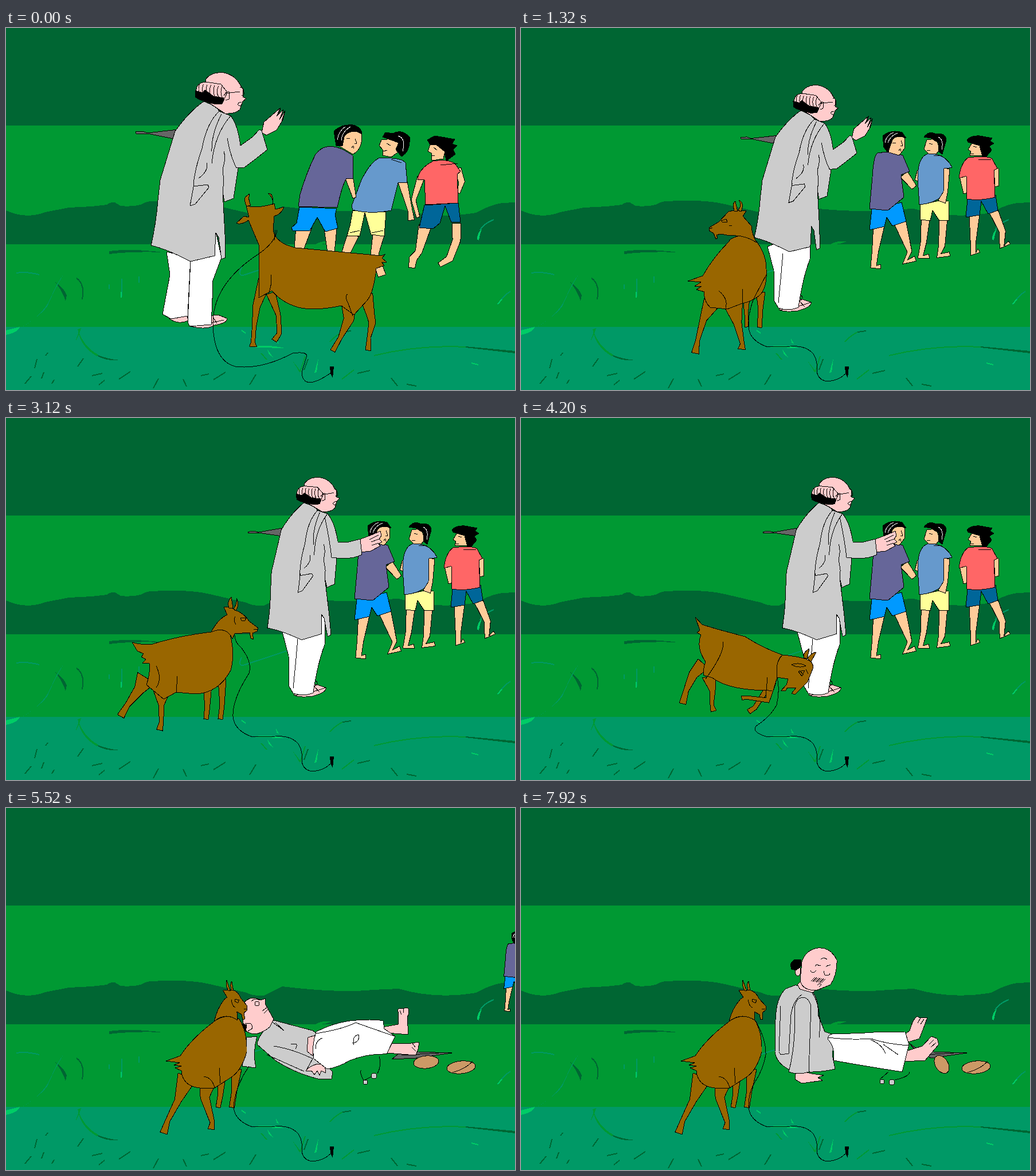
Recreate the animation shown at these times as an HTML page. Size 888 by 631 pixels, loop 8 s.

```html
<!DOCTYPE html>
<html lang="en">
<head>
<meta charset="utf-8">
<title>The goat in the field</title>
<style>
html, body { margin: 0; width: 100%; height: 100%; overflow: hidden; background: #063; }
svg { display: block; width: 888px; height: 631px; shape-rendering: crispEdges; }
path { vector-effect: non-scaling-stroke; stroke-linejoin: round; }
</style>
</head>
<body>
<svg id="stage" viewBox="0 0 888 631"></svg>
<script>
const LOOP = 8000, STEP = 120;
const stage = document.getElementById('stage');
const black = '#000', white = '#fff', grey = '#ccc', pink = '#fcc', slate = '#666', tan = '#fc9';
const leather = '#c96', brown = '#960', dark = '#063', green = '#093', teal = '#096', lime = '#0c6';

function add(parent, tag, attrs) {
  const node = document.createElementNS('http://www.w3.org/2000/svg', tag);
  for (const key in attrs) node.setAttribute(key, attrs[key]);
  return parent.appendChild(node);
}
const flat = (fill, d) => add(stage, 'path', { d, fill });
const blade = (stroke, d) => add(stage, 'path', { d, fill: 'none', stroke, 'stroke-width': 2 });

// Scenery
flat(dark, 'M0 0H888V170H0Z');
flat(green, 'M0 170H888V521H0Z');
flat(teal, 'M0 521H888V631H0Z');
flat(dark, 'M0 318Q35 334 68 321L110 313 150 311 176 308Q182 303 190 304L200 310Q220 312 235 308 245 302 255 302 320 298 360 308L420 322Q430 328 450 327L482 311Q580 323 640 317L685 315Q750 334 820 322 845 308 865 305L888 304V377H0Z');
flat(dark, 'M180 389Q220 384 273 391Q220 389 180 394Z');
flat(dark, 'M86 443Q102 454 106 466L104 476Q98 458 86 443Z');
flat(teal, 'M100 430Q88 446 79 468 66 500 25 523 62 500 72 485 85 455 100 430Z');
flat(lime, 'M0 527L24 521Q22 530 0 535Z');
flat(lime, 'M430 556Q455 551 487 558L440 557ZM545 576L542 600 538 601ZM471 541l5 9-4-1Z');
flat(lime, 'M822 369Q822 357 830 350Q826 362 825 370ZM456 560l10 14-7-5Z');
flat(green, 'M131 523Q128 536 121 546L127 530Q138 558 162 570L158 572Q130 556 125 525Z');
flat(green, 'M540 377Q552 370 568 372Q555 378 540 377ZM500 580l14 18-2 2Z');
flat(dark, 'M160 570Q180 578 201 579Q175 581 160 572ZM802 555L888 563V567L802 557Z');
blade(teal, 'M18 427Q35 424 58 430M180 447v8M202 437v31M232 433v11');
blade(teal, 'M505 401L420 429Q402 436 411 417M858 482Q866 468 880 459M827 352Q835 340 851 334');
blade(dark, 'M123 436Q138 446 133 473M587 530l15-2M613 602l22-5M527 577l-7 19');
blade(dark, 'M73 566l-4 5M54 577l-4 16M66 600l-4 11M44 607l-11 13M84 613l-4 7M135 576l-10 14M168 602l-18 4M217 599l-20 13');
blade(dark, 'M172 614l-10 8M266 611l-9 17M309 612l6 13M340 606l14-3M383 600l-21 13M436 604l-11 18M672 610l11 14M699 621l17 3');
blade(green, 'M642 571Q720 552 802 556M565 547Q575 536 587 530M586 612l21-16M445 567l10 11M522 572l-9 28');
blade(lime, 'M411 527l7 5M812 584l12 3M201 460v10M858 481l7-8');

// Pose drawing: each shape call adds to the pose opened last.
const art = {};
let sheet;
const pose = name => { sheet = art[name] = []; };
const ink = (fill, d) => sheet.push({ d, fill, stroke: black });
const line = d => ink('none', d);
const shine = d => sheet.push({ d, fill: 'none', stroke: white });
const oval = (fill, x, y, rx, ry, tilt = 0) =>
  ink(fill, `M${x - rx * Math.cos(tilt)} ${y - rx * Math.sin(tilt)}` +
    [1, -1].map(s => `a${rx} ${ry} ${tilt * 180 / Math.PI} 0 1 ${2 * s * rx * Math.cos(tilt)} ${2 * s * rx * Math.sin(tilt)}`).join(''));

// A tapering limb along joints given as "x y width".
function limb(fill, text) {
  const joints = text.split('  ').map(j => j.split(' ').map(Number));
  const side = s => joints.map(([x, y, w], i) => {
    const a = joints[Math.max(0, i - 1)], b = joints[Math.min(joints.length - 1, i + 1)];
    const angle = Math.atan2(b[1] - a[1], b[0] - a[0]) + s * Math.PI / 2;
    return `${(x + Math.cos(angle) * w / 2).toFixed(1)} ${(y + Math.sin(angle) * w / 2).toFixed(1)}`;
  });
  ink(fill, `M${[...side(1), ...side(-1).reverse()].join('L')}Z`);
}
const strands = (x, y, dx, dy, curl) =>
  line(Array.from({ length: 7 }, (_, i) => `M${x + i * dx} ${y + i * dy}${curl}`).join(''));

// Boys
pose('boy1Turn');
limb(tan, '598 258 14  608 296 6');
limb(tan, '520 345 28  510 390 15');
limb(tan, '566 350 22  567 392 12');
ink('#09f', 'M512 312L577 315 574 325 579 349 557 355 543 330 530 353 500 353 498 348 507 340Z');
ink('#669', 'M560 207Q575 205 590 213L605 222 606 262 594 262Q586 275 578 313L510 311 513 290Q525 250 540 220 550 208 560 207Z');
ink(tan, 'M582 190Q592 174 612 178L621 185Q622 212 605 220L580 205Z');
ink(black, 'M572 180Q585 167 605 169 620 172 621 185L611 180Q595 180 590 190L587 205 576 205Z');
shine('M578 195Q580 180 592 172M585 196Q586 181 601 172');
line('M594 192l6 1M609 193l3 8-4 1M603 209q4-7 4 1');

pose('boy2Turn');
limb(tan, '692 268 16  705 318 8  707 335 11');
limb(tan, '606 360 20  592 394 14');
limb(tan, '650 360 20  643 395 14  656 432 14');
ink('#ff9', 'M605 318L663 321 660 363 637 360 626 322 617 363 595 362 600 345Z');
ink('#69c', 'M650 227Q690 225 697 235L700 269 684 270 672 318Q635 325 605 317L603 310 620 265Q635 235 650 227Z');
ink(tan, 'M655 195L685 192 690 212 672 225 657 222 657 212 651 205Z');
ink(black, 'M657 190L662 182 675 184Q690 175 704 190 706 215 690 224L680 212 685 200Z');
shine('M684 188Q698 192 692 215');
line('M664 201l7 4M658 215l7-2M600 357l17-4M638 357l20-4M672 229l18 6');

pose('boy3Turn');
limb(tan, '724 260 13  711 300 8  719 330 6');
limb(tan, '788 245 12  795 268 11  790 288 4');
limb(tan, '731 345 22  720 390 12  710 402 14  708 418 11');
limb(tan, '786 340 16  786 370 14  774 402 13  756 413 8');
ink('#069', 'M730 309L789 305 793 338 777 339 766 310 757 340 745 350 721 348Z');
ink('#f66', 'M745 232Q770 228 783 236L793 250 787 255 789 305 732 308 730 265 718 264Q720 245 745 232Z');
ink(tan, 'M740 203L756 200 766 215 763 228 743 231 742 218 736 215Z');
ink(black, 'M735 195L748 188 783 194 778 202 787 205 780 212 784 220 768 232 765 215 750 203 740 203Z');
line('M746 208l6 5M742 222l6 1M758 239l30-3');

pose('boy1');
limb(tan, '668 255 16  686 278 10');
limb(tan, '625 340 20  618 390 11  615 416 11  627 416 8');
limb(tan, '660 335 22  678 390 8  670 408 11  688 402 9');
ink('#09f', 'M612 316L664 304 672 337 648 345 638 330 634 346 608 352Z');
ink('#669', 'M622 218Q645 214 666 222L678 250 663 256 668 295 640 318 608 315 613 260Q615 222 622 218Z');
ink(tan, 'M640 195Q655 183 670 192L669 210 660 222 642 217Z');
ink(black, 'M631 188Q645 176 665 182L672 192Q655 185 648 195L640 217 633 208Z');
shine('M635 200Q637 187 650 182M640 200Q644 188 657 183');
line('M648 200l6 1M663 196l3 9-4 1M659 214q4-7 4 1');

pose('boy2');
limb(tan, '696 250 10  690 266 6');
limb(tan, '706 330 15  702 375 10  697 399 10  712 398 8');
limb(tan, '737 330 14  734 380 11  729 397 10  748 394 7');
ink('#ff9', 'M696 308L735 300 746 302 747 335 730 336 718 318 714 336 697 334Z');
ink('#69c', 'M710 219Q740 218 752 243L738 246 737 290Q725 305 695 308L692 262Q692 225 710 219Z');
limb(tan, '743 245 10  741 285 7  734 303 14');
ink(tan, 'M708 195L725 193 730 212 725 219 712 220 703 211Z');
ink(black, 'M703 190Q712 178 724 185 740 182 742 195L735 220 728 215 728 200 715 192Z');
shine('M728 190Q738 195 734 212');
line('M712 201l6 2M708 214l6-1M720 222l14 0');

pose('boy3');
limb(tan, '771 256 13  776 288 8');
limb(tan, '829 245 8  830 276 6');
limb(tan, '791 325 18  789 370 10  789 394 11  799 388 7');
limb(tan, '824 318 16  840 355 11  839 382 9  852 374 6');
ink('#069', 'M779 298L828 291 832 318 815 324 803 302 800 326 776 330Z');
ink('#f66', 'M780 226Q815 222 822 228L831 245 825 248 827 295Q800 302 778 298L777 258 764 262Q767 235 780 226Z');
ink(tan, 'M787 200L800 203 806 222 783 222 785 215 780 212Z');
ink(black, 'M778 195Q785 187 800 188L822 192 818 197 825 201 817 206 821 213 812 224 805 224 800 205 780 199Z');
line('M789 206l6 2M785 219l5 0M798 230l22-1');

// Man
pose('strideLegs');
ink(pink, 'M284 506Q300 518 318 510L316 502 290 500Z');
ink(pink, 'M322 520Q350 527 364 518 388 514 385 506L370 500 355 502Z');
line('M322 521Q350 516 380 509M362 505l6 10');
ink(white, 'M280 390L286 430 273 499 288 507 317 502 322 400Z');
ink(white, 'M322 405L317 512 320 520 358 517Q360 480 361 440L376 400 366 355Z');

pose('standLegs');
ink(pink, 'M502 483Q512 488 535 485 560 478 558 470L540 464 508 476Z');
line('M502 484Q530 480 558 470M535 460q9-4 8 4l-5 4 9 10');
ink(white, 'M482 373L493 415 494 468 501 480Q520 486 536 479 543 430 556 395L557 343Z');
line('M509 385L505 430 501 471');

pose('walk');
ink(slate, 'M226 181L238 180 247 183 300 177 297 194 247 184 227 184Z');
ink(grey, 'M345 128Q367 136 372 145L392 153Q405 170 409 205L405 245 397 297 381 303 378 285 382 360 383 400 376 403 371 365 366 357 364 397 322 407Q280 385 253 379 262 340 265 300L269 265 295 180Q320 145 345 128Z');
line('M373 144Q350 165 342 210 328 250 327 276L352 273 354 278 330 307 321 310 328 272');
line('M376 150Q358 185 359 215M392 153Q364 185 359 236M350 235q4 14-14 27M380 215Q384 228 378 245L380 268 378 285');
ink(pink, 'M348 90Q358 76 380 78 400 82 409 100L414 107 413 120 419 123 413 128 408 142Q400 150 382 149L348 126Z');
ink(pink, 'M333 120Q327 96 348 94L375 98 386 112 378 130Z');
ink(black, 'M330 109L343 113 347 108 362 119 380 122 377 132 365 133 338 125 331 121Z');
strands(338, 97, 6.5, .8, 'q-4 10 0 19');
line('M380 118q6-10 10-6l-1 12-6 2M382 114l26-3M408 103q8 0 7 14l-4 1M411 129q-10 2-4 7l3-1');

pose('armUp');
ink(pink, 'M446 182L450 164 479 139 476 150 484 142 480 155 487 144 483 160 472 178 454 187Z');
ink(black, 'M479 139l-7 15 4-4ZM484 142l-7 18 3-5ZM487 144l-6 18 2-2Z');
ink(grey, 'M386 192Q392 225 402 244L416 243Q440 225 456 212L446 179 442 177 430 190 409 205');

pose('armOut');
ink(pink, 'M616 212L640 203 653 197 655 205 651 211 656 216 650 219 653 223 636 232 618 234Z');
line('M634 212l16-8M637 216l14-5M638 222l12-4');
ink(grey, 'M556 172Q565 215 568 243 602 248 621 238L618 211 598 216 579 216');

pose('fall');
ink(pink, 'M648 235L656 232 668 246 655 252ZM668 330L676 324 679 345 677 361 670 361Z');
ink(white, 'M600 305L612 303Q640 325 672 336L673 360 655 376Q630 355 613 339L596 338Z');
ink(white, 'M597 275Q640 268 653 250L668 245 683 262 682 274Q650 300 600 308Z');
oval(leather, 688, 281, 14, 7);
ink(pink, 'M478 183L477 160 489 143 491 153 496 145 496 155 501 149 505 161 495 186Z');
ink(grey, 'M425 236Q460 230 472 215 477 198 473 181L498 184Q497 210 488 225L465 247Q490 266 515 272 540 280 545 268L583 262 600 273 602 290Q590 340 587 381 575 382 570 370 545 352 515 357 480 345 470 340L481 377 437 381 441 360 436 325Q400 300 390 275 400 245 425 236Z');
line('M400 256Q440 290 436 325M410 248Q438 280 445 315M425 238Q458 290 470 342M451 313q9 7 4 22M585 267l-24 17 41-4');
ink(pink, 'M352 240Q362 222 385 220L392 214 395 221 404 225 411 240 405 250 380 278Q345 275 352 240Z');
ink(pink, 'M364 266Q360 284 378 288L394 252 385 244Z');
ink(black, 'M389 247L398 254 394 268 387 272 378 288 372 284 379 270Z');
strands(364, 264, 3.5, -3, 'q-6 6-3 14');
line('M382 240q10-4 11 6M390 215l7 12M398 226q7 2 4-6');

pose('lie');
ink(pink, 'M657 382L684 377 684 355Q682 348 690 350L700 348Q706 352 700 365L702 395 665 392Z');
ink(pink, 'M665 410L700 411 721 408 719 420 715 431 664 427Z');
line('M687 353l3 7M693 350l1 7M709 410l5 7M708 417l7 7');
ink(grey, 'M420 400L438 398Q430 425 436 453L412 450Z');
ink(grey, 'M467 370L535 388 545 395 540 430 570 460 568 472 548 473Q505 463 470 440L438 412Q440 395 467 370Z');
line('M455 430L520 459M467 415Q500 420 535 437L523 459M463 372l22 16-15-14M497 412q15-4 8 8');
ink(pink, 'M527 400L540 396 535 432 525 424Z');
ink(pink, 'M523 458Q536 443 556 447L558 462 550 458 547 466 543 458 538 465 533 458Z');
ink(white, 'M541 390Q570 375 600 371 640 367 658 371L660 385 679 398 664 429Q630 428 600 440 580 452 560 455L537 437Q533 415 541 390Z');
line('M541 393Q590 385 610 374 640 385 679 398M540 420q0-15 12-19M607 413q-4-15 8-18 3 13-11 15');
ink(pink, 'M415 340Q425 326 445 335L452 332 453 343 467 368 460 382Q435 402 418 388 410 372 415 340Z');
ink(black, 'M411 376l9 2-2 12Z');
oval('none', 438, 341, 4, 4);
line('M428 337q8-7 14-2M447 354l9-7M450 358l8-8M417 376q13-4 13 8l-8 5');

pose('sit');
ink(pink, 'M668 396L678 388Q685 365 692 363L695 366 709 365Q702 385 695 402L676 408Z');
ink(pink, 'M668 425L700 415 716 398 726 402 729 412 705 440 668 442Z');
line('M692 375l5-9M697 377l6-9M712 412l8-8M715 417l9-8');
ink(grey, 'M478 309Q490 308 509 321 520 335 518 360L530 390 548 396 543 430 548 455Q510 464 470 457 445 445 443 425L444 370Q445 330 462 315Z');
ink(white, 'M535 403Q536 392 550 394L600 392 615 391 670 390 677 412 665 460Q600 450 545 440 548 415 535 403Z');
line('M535 400Q580 405 610 402 640 412 677 414M610 404q20 8 26 24M632 412l26 18');
ink(pink, 'M480 456L507 463 528 466 518 470 526 475 490 480 478 473Z');
ink(grey, 'M478 360Q475 340 485 332 500 325 506 345L502 460Q485 466 467 460 478 420 478 360Z');
line('M453 345L450 425 453 430 467 428 471 360Q475 335 490 325M508 322Q526 350 520 400');
ink(pink, 'M482 308L487 316 509 322 515 316 490 300Z');
ink(pink, 'M490 268Q497 247 518 244 540 242 551 265 552 290 540 308L515 318Q490 318 487 300Z');
oval(pink, 483, 284, 5, 9);
ink(black, 'M470 272L476 265 488 264 489 275 480 283 472 281Z');
line('M523 264q5-5 11 0M513 276q4-6 6-1l4-1M532 277q4-4 8-3M505 283q3 8 10 0M528 284l2 7q8 3 9-3');
strands(506, 302, 3, .5, 'l7-7');
line('M517 309q3-5 7-1l-4 4');

// Scattered belongings
pose('airProps');
ink(slate, 'M613 179L700 214 709 221 705 237 696 235 693 243 691 232Q650 205 613 179Z');
line('M613 179L697 228M640 195l64 27M703 238q3 8 11 8 4-6-8-14M614 238q2-10 20-10l0-6');
oval(grey, 618, 239, 5, 4);
oval(grey, 635, 246, 5, 4);
oval(leather, 759, 332, 18, 9, 2);

function belongings(name, lift, glasses) {
  pose(name);
  ink(slate, `M${lift ? '677 410' : '673 438'}L690 424 778 427 715 436Z`);
  line('M690 431l65-4');
  if (lift) oval(leather, 734, 447, 17, 11, 1);
  else oval(leather, 733, 443, 22, 11, -.1);
  oval(leather, 794, 452, 25, 11, -.1);
  line('M779 461q25-7 35-20');
  glasses();
}
belongings('ground', false, () => {
  line('M620 457q-4 3 4 18l14-7M648 463q8-16 3-30');
  oval(grey, 627, 478, 4, 4);
  oval(grey, 642, 467, 5, 5);
});
belongings('groundLate', true, () => {
  line('M626 473l15-13M652 474q28-6 26-16');
  oval(grey, 630, 477, 4, 4);
  oval(grey, 647, 478, 5, 5);
});

// Goat
pose('goatAway');
limb(brown, '462 462 16  475 500 8  477 532 8  468 545 10');
limb(brown, '452 440 24  437 485 13  433 520 7  431 548 7  431 555 13');
limb(brown, '598 480 26  598 508 18  583 540 7  570 563 9');
limb(brown, '628 465 24  636 500 14  639 514 12  633 540 6  632 562 10');
ink(brown, 'M419 310Q440 315 468 306L470 316 485 312Q480 325 468 328L466 352Q470 375 505 383L655 397 662 394 656 401 664 408 655 408 660 414 646 419Q642 460 630 475L607 500 585 484Q540 494 510 487 480 478 464 458L441 470 442 380 423 335Q410 344 402 340L415 328 424 330Z');
ink(brown, 'M420 311Q414 300 418 294L425 289Q422 300 427 309ZM466 306Q466 295 457 288 468 288 465 308Z');
line('M470 352l-2 18M462 430q3 15-4 33M596 464q-6 3 1 16l8 22');

pose('goatBack');
limb(brown, '393 470 12  393 500 6  394 521 8');
limb(brown, '418 460 16  418 490 8  416 522 8');
limb(brown, '333 478 30  318 508 12  308 545 7  304 567 13');
limb(brown, '370 480 34  378 515 14  386 550 7  385 560 13');
ink(brown, 'M363 370Q390 352 411 372 428 395 428 420 430 455 415 467 400 478 386 480L360 490 330 487Q318 475 320 460L306 456 315 450 303 450 314 443 291 441 317 432Q335 400 363 372Z');
ink(brown, 'M411 374Q403 360 402 345L387 328 393 319Q375 316 362 320L345 338 328 348 328 353 336 358 340 368 343 366 341 361 348 359 365 362Q390 360 411 374Z');
ink(brown, 'M372 319Q368 305 374 302L378 320ZM379 318Q386 308 380 300 390 304 384 320Z');
line('M349 336l9-3 2 5-8 1ZM329 350l5-2M363 345l5-1M345 458q17 14 12 30M386 455l0 25');

pose('goatSide');
limb(brown, '352 465 14  351 505 9  349 525 8');
limb(brown, '377 455 14  377 500 8  374 525 8');
limb(brown, '272 470 34  271 500 10  271 530 7  268 544 11');
limb(brown, '245 453 36  232 474 18  212 500 9  200 520 13');
ink(brown, 'M358 373Q380 360 391 378 400 410 392 440 370 480 330 481L297 478 275 490 245 465Q252 445 250 428L238 427 244 421 236 416 240 411 229 406 220 391Q235 396 256 394 300 380 358 373Z');
ink(brown, 'M358 373Q370 350 386 343L380 330Q390 328 400 335 415 340 425 355L440 366 438 372 430 375 432 386 427 384 425 374 399 376 395 385Q385 362 358 373Z');
ink(brown, 'M389 331Q385 320 393 312L396 332ZM397 333Q404 322 402 314 408 325 401 336Z');
line('M409 349l10-1-2 5-6 0ZM400 346q-4 6 1 14M432 368l7 0M262 432Q273 455 262 470M299 450l-2 28');

pose('goatCharge');
limb(brown, '428 474 9  408 505 8  397 512 9');
limb(brown, '436 460 18  430 492 10  392 487 6  385 488 8');
limb(brown, '328 450 24  334 475 10  333 500 6  336 511 10');
limb(brown, '318 428 24  300 448 16  288 475 9  282 498 12');
ink(brown, 'M304 347L316 360Q340 368 391 381 420 400 456 413L447 452 440 475Q365 476 334 453L318 448Q318 435 322 425 305 400 314 378L307 374 312 370Z');
ink(brown, 'M456 413Q480 415 497 420 512 425 509 437L500 460 478 482 472 480 480 470 465 470 462 475 453 476 463 465 466 455 447 452Q443 425 456 413Z');
ink(brown, 'M494 418Q490 410 503 402L499 420ZM500 419Q505 410 515 408L506 425Z');
line('M472 430q13 7 25 2-12-7-25-2M484 442l11-2-5 10ZM486 440l7 8M497 438l4 8M353 390Q355 410 322 455M430 452l-2 22');

pose('goatStand');
limb(brown, '340 458 16  336 490 10  319 516 9');
limb(brown, '364 440 18  372 477 12  355 523 9');
limb(brown, '238 448 34  220 468 14  212 495 7  213 519 13');
limb(brown, '218 430 40  190 460 16  181 490 11  168 515 11');
ink(brown, 'M202 367L217 374Q260 371 295 371 340 378 372 377L368 420 358 450Q340 466 300 466 262 465 250 442L225 455 205 436Q203 405 218 393L207 390 213 385Z');
ink(brown, 'M372 377L420 376 427 382 427 410 418 428 415 438 408 437 410 430 402 428 397 436 386 437 396 420 385 405Q388 414 374 420L366 413Q366 395 372 377Z');
ink(brown, 'M405 375Q396 365 409 353L410 374ZM416 376Q412 362 424 356L420 376Z');
line('M384 390q16 5 26-8M408 394l10 2-8 6ZM410 392l6 10M418 390l5 6M248 423q-3 12-26 32M357 437l7 9');

pose('goatWatch');
limb(brown, '376 470 14  374 500 9  370 522 8');
limb(brown, '402 455 18  398 495 9  394 522 9');
limb(brown, '352 478 28  347 505 16  360 548 8  358 560 12');
limb(brown, '316 468 34  300 510 12  282 545 8  275 567 13');
ink(brown, 'M366 370Q385 358 407 368 421 390 420 425 412 455 395 468L364 488 338 488Q308 485 306 458L295 453 306 450 293 448 303 444 279 441 304 432Q325 400 366 370Z');
line('M345 468q15 2 19 20M372 453l2 27');

pose('headUp');
ink(brown, 'M363 372Q368 350 383 333L388 330 380 318 398 317Q410 320 415 332L427 345 427 352 421 357 422 368 418 369 416 360 407 355 408 370Q385 355 363 372Z');
ink(brown, 'M390 318Q384 308 387 300L394 319ZM396 317Q393 306 397 302L400 318Z');
line('M403 333l8 2-2 5-6-3ZM396 334q2 12 8 14M420 350l6 0');

// Rope: a loose lead that settles into the same tail by the peg.
function rope(name, lead, tail = 'Q398 545 430 556') {
  pose(name);
  line(lead + tail + 'L470 555Q497 553 510 568 518 580 516 598 518 612 530 615 550 618 567 602');
}
pose('ropeTaut');
line('M473 352Q471 372 442 393 361 445 361 515 362 580 400 590 445 596 500 567 528 563 524 574L516 600Q518 635 567 601');
rope('ropeBack', 'M428 430Q420 445 407 470 396 495 397 520');
rope('ropeSide', 'M399 376Q398 390 410 400 430 425 424 445 395 490 396 520');
rope('ropeCharge', 'M447 452Q452 475 446 500 436 520 410 537', 'Q402 548 430 556');
rope('ropeStand', 'M374 420Q382 450 400 454 417 462 407 485 396 505 396 520');
rope('ropeBite', 'M424 450Q400 485 397 520');
rope('ropeWatch', 'M410 372Q428 405 427 430 423 455 408 478 397 495 397 520');

const at = (x, y) => [1, 0, 0, 1, x, y];
const zoom = (s, x, y) => [s, 0, 0, s, x, y];
const turn = (deg, cx, cy, dx = 0, dy = 0) => {
  const m = new DOMMatrix().translate(cx + dx, cy + dy).rotate(deg).translate(-cx, -cy);
  return [m.a, m.b, m.c, m.d, m.e, m.f];
};
const home = at(0, 0), near = zoom(.882, 183.8, 31.1), beside = [.845, -.046, .0553, .853, 221.2, 54.4];

// Layers, back to front. A cue is [time, pose, matrix]; neighbours with one pose are blended.
const layers = [];
function layer(...track) {
  const poses = {};
  for (const [, name] of track) {
    if (!name || poses[name]) continue;
    poses[name] = add(stage, 'g', { visibility: 'hidden' });
    for (const shape of art[name]) add(poses[name], 'path', shape);
  }
  layers.push({ track, poses });
}
function boyLayer(name, turned, away, gone, end) {
  layer([0, name + 'Turn', home], [480, name + 'Turn', turned], [600, name, at(-15, 0)], [840, name, home],
    [4320, name, home], [4920, name, away], [end, name, gone], [end + STEP]);
}
boyLayer('boy3', at(24, 0), zoom(.61, 402, 99), zoom(.58, 500, 105), 5280);
boyLayer('boy2', at(24, 0), zoom(.645, 348, 96), zoom(.6, 500, 105), 5520);
boyLayer('boy1', at(30, 6), zoom(.61, 352.5, 105), zoom(.58, 545, 110), 5640);
layer([0], [4440, 'airProps', at(-60, 20)], [4920, 'airProps', home], [5280, 'airProps', at(45, 170)],
  [5400, 'ground', home], [6480, 'groundLate', home]);
layer([0, 'strideLegs', home], [480, 'strideLegs', zoom(.955, 70, 12)], [600, 'standLegs', at(-116, 20)],
  [1320, 'standLegs', at(-52, 8)], [1680, 'standLegs', home], [4440]);
layer([0, 'walk', home], [1320, 'walk', near], [1680, 'walk', beside], [4440, 'fall', turn(48, 520, 300)],
  [4920, 'fall', home], [5280, 'fall', turn(-6, 480, 300, 30, 75)], [5400, 'lie', home], [6480, 'sit', home]);
layer([0, 'armUp', home], [1320, 'armUp', near], [1680, 'armUp', beside], [1800, 'armOut', home], [4440]);
layer([0, 'goatAway', home], [600, 'goatAway', at(-40, 0)], [720, 'goatBack', at(20, 0)], [1320, 'goatBack', home],
  [2400, 'goatBack', at(36, -8)], [2640, 'goatSide', home], [3360, 'goatSide', home], [3840, 'goatSide', at(-28, -8)],
  [3960, 'goatCharge', at(-60, 0)], [4200, 'goatCharge', home], [4320, 'goatCharge', at(20, 0)],
  [4560, 'goatStand', home], [5280, 'goatStand', at(26, 6)], [5400, 'goatWatch', home]);
layer([0], [5400, 'headUp', [.9, 0, 0, 1, 36.6, 0]], [6360, 'headUp', home]);
layer([0, 'ropeTaut', home], [720, 'ropeBack', home], [2640, 'ropeSide', home], [3960, 'ropeCharge', home],
  [4560, 'ropeStand', home], [5400, 'ropeBite', home], [6360, 'ropeWatch', home]);
flat(black, 'M565 590L572 590 570 610 566 602Z');

function draw(time) {
  for (const { track, poses } of layers) {
    const i = track.findLastIndex(cue => cue[0] <= time);
    const [start, current, from] = track[i], next = track[i + 1];
    for (const name in poses) poses[name].setAttribute('visibility', name === current ? 'visible' : 'hidden');
    if (!current) continue;
    const moving = next && next[1] === current && current !== 'headUp';
    const blend = moving ? (time - start) / (next[0] - start) : 0;
    const matrix = blend ? from.map((v, k) => v + (next[2][k] - v) * blend) : from;
    poses[current].setAttribute('transform', `matrix(${matrix})`);
  }
}

const begin = performance.now();
function tick() {
  const time = (performance.now() - begin) % LOOP;
  draw(Math.floor(time / STEP) * STEP);
  requestAnimationFrame(tick);
}
tick();
</script>
</body>
</html>
```
